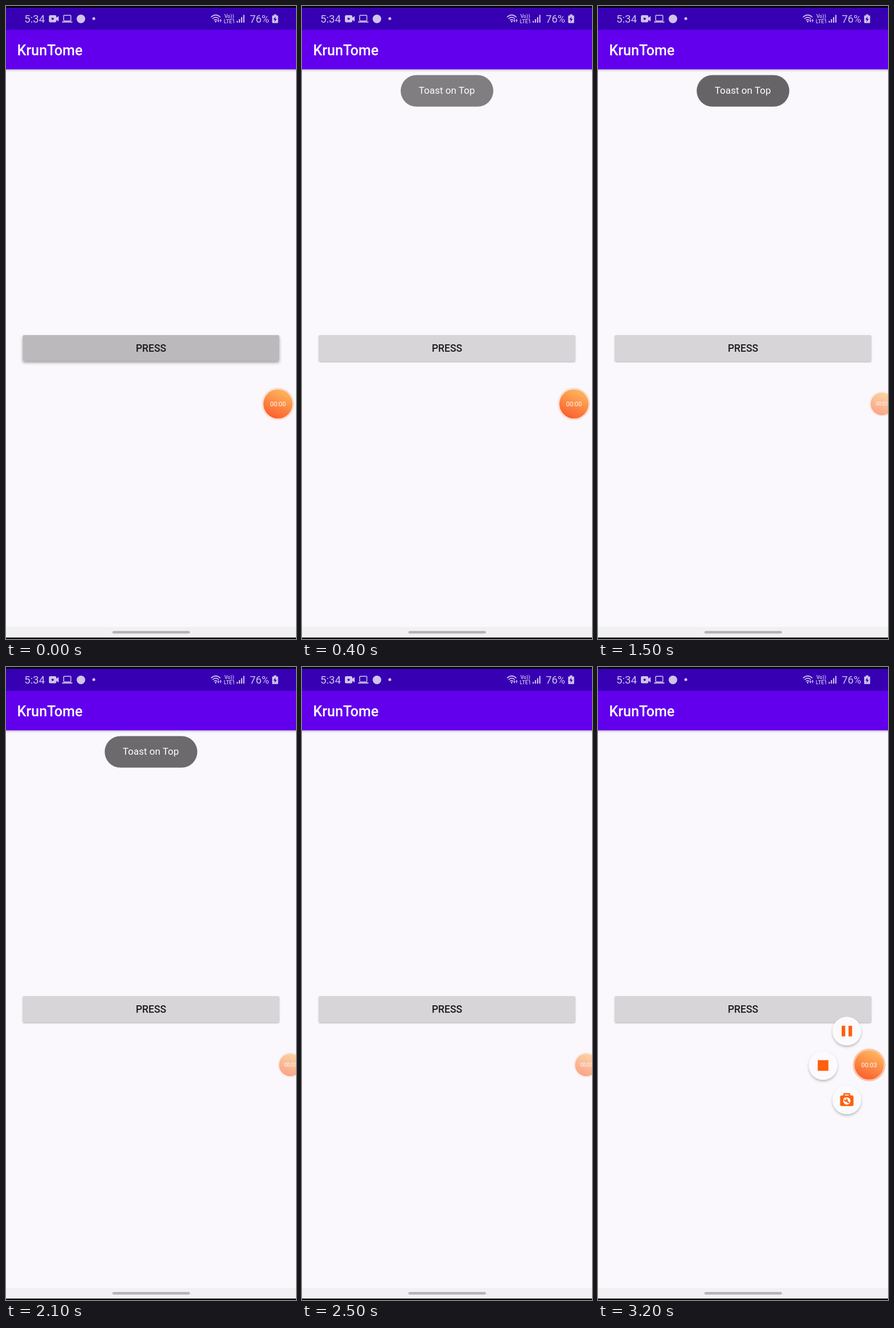
Recreate the animation shown at these times as an HTML page. Size 507x1104 px, loop 3.5 s.

```html
<!DOCTYPE html>
<html lang="en">
<head>
<meta charset="utf-8">
<title>Toast demo</title>
<style>
html, body { margin: 0; width: 100%; height: 100%; overflow: hidden; background: #faf8fc; }
svg { display: block; width: 100vw; height: 100vh; }
text { font-family: Roboto, sans-serif; }
.mid { text-anchor: middle; }
</style>
</head>
<body>
<svg viewBox="0 0 507 1104" preserveAspectRatio="none">
  <defs>
    <linearGradient id="glow" x1=".7" y1=".05" x2=".3" y2=".97">
      <stop offset="0" stop-color="#fdb55d"/>
      <stop offset="1" stop-color="#fb602e"/>
    </linearGradient>
    <linearGradient id="barShade" x1="0" y1="0" x2="0" y2="1">
      <stop offset="0" stop-color="#000" stop-opacity=".2"/>
      <stop offset="1" stop-color="#000" stop-opacity="0"/>
    </linearGradient>
    <filter id="lift" x="-30%" y="-30%" width="160%" height="170%">
      <feDropShadow dx="0" dy="2.5" stdDeviation="2.3" flood-color="#000" flood-opacity=".27"/>
    </filter>
    <filter id="btnShade" filterUnits="userSpaceOnUse" x="15" y="560" width="480" height="80">
      <feDropShadow id="drop" dx="0" dy="1" stdDeviation="1" flood-color="#000" flood-opacity=".3"/>
    </filter>
  </defs>

  <rect width="507" height="1104" fill="#faf8fc"/>
  <rect y="110" width="507" height="5" fill="url(#barShade)"/>
  <rect y="41" width="507" height="69.5" fill="#6200ee"/>
  <rect y="2" width="507" height="39.5" fill="#3700b3"/>
  <rect width="507" height="3" fill="#000"/>
  <text x="19.5" y="86" font-size="25" font-weight="500" fill="#fff">KrunTome</text>

  <g fill="#d0c4ec">
    <text x="32" y="29.3" font-size="18.7">5:34</text>
    <rect x="75" y="16" width="13" height="12.5" rx="2.5"/>
    <path d="M87 21 L92 17.5 V27 L87 23.5Z"/>
    <circle cx="81.5" cy="22.2" r="2" fill="#3700b3"/>
    <rect x="100.8" y="16.3" width="12.6" height="9.6" rx="1" fill="none" stroke="#d0c4ec" stroke-width="1.5"/>
    <rect x="98" y="27" width="18" height="1.8"/>
    <circle cx="131" cy="22.5" r="7.5"/>
    <circle cx="153.5" cy="22" r="2.5"/>
    <g fill="none" stroke="#d0c4ec" stroke-width="1.5">
      <path d="M358.4 19.4 Q366.6 11.8 374.8 19.4"/>
      <path d="M361 22.3 Q366.6 17 372.2 22.3"/>
      <path d="M363.6 25 Q366.6 22.2 369.4 25"/>
    </g>
    <circle cx="366.6" cy="27.2" r="1.4"/>
    <path d="M369.4 25.6h1.3v-2.6h1.2v2.6h1.3l-1.9 3z M373.3 25.6l1.9-3 1.9 3h-1.3v2.7h-1.2v-2.7z"/>
    <text class="mid" x="390.3" y="21.4" font-size="9" font-weight="500">Vo))</text>
    <text class="mid" x="390.5" y="30" font-size="9" font-weight="500">LTE1</text>
    <path d="M403.3 29v-3h2.1v3z M407.1 29v-6h2.1v6z M410.9 29v-9.5h2.1v9.5z M414.7 29v-13.5h2.1v13.5z"/>
    <text x="426.3" y="29.3" font-size="18.3">76%</text>
    <path d="M468.5 14.5h4v2h2a1.2 1.2 0 0 1 1.2 1.2v10.8a1.2 1.2 0 0 1-1.2 1.2h-8a1.2 1.2 0 0 1-1.2-1.2v-10.8a1.2 1.2 0 0 1 1.2-1.2h2z"/>
    <path d="M471.4 18.3l-4 5.4h2.6l-.6 4.2 4.1-5.4h-2.7z" fill="#3700b3"/>
  </g>

  <g id="toast">
    <rect x="172.5" y="120.5" width="162" height="55" rx="27.5" fill="#666466"/>
    <text class="mid" x="253.2" y="153.2" font-size="17" fill="#fff">Toast on Top</text>
  </g>

  <rect id="btn" x="29.3" y="574" width="448.4" height="45.7" rx="2" filter="url(#btnShade)"/>
  <text class="mid" x="253.5" y="603.3" font-size="17.5" font-weight="500" fill="#1b1a1c">PRESS</text>

  <rect y="1083" width="507" height="19" fill="#f2f0f3"/>
  <rect x="186" y="1090" width="135.5" height="4.6" rx="2.3" fill="#b5b3b6"/>
  <rect y="1101.5" width="507" height="2.5" fill="#000"/>

  <g id="menu" fill="#ff600c">
    <g>
      <circle r="25" fill="#fbfafc" filter="url(#lift)"/>
      <path d="M-9 -9.3h6.2v18.6h-6.2z M3 -9.3h6.2v18.6h-6.2z"/>
    </g>
    <g>
      <circle r="25" fill="#fbfafc" filter="url(#lift)"/>
      <rect x="-9.3" y="-9.3" width="18.6" height="18.6"/>
    </g>
    <g>
      <circle r="25" fill="#fbfafc" filter="url(#lift)"/>
      <rect x="-11.7" y="-7.8" width="23.4" height="18.6" rx="2.4"/>
      <path d="M-4.8 -7v-3.5h9.6v3.5" fill="none" stroke="#ff600c" stroke-width="2.4" stroke-linejoin="round"/>
      <circle cy="1.8" r="6.4" fill="#fbfafc"/>
      <path d="M-1 .8 L3.6 5.4" stroke="#ff600c" stroke-width="2.6"/>
      <circle cx="-1.6" cy=".2" r="3"/>
      <path d="M-5.5 -2.2l2.3 -2.3 2.7 3.5 -1.7 1.7z" fill="#fbfafc"/>
    </g>
  </g>

  <g id="bubble">
    <circle id="ring" r="28.6" fill="#fb7a3c"/>
    <circle r="25.6" fill="#faf8fc"/>
    <circle r="25.6" fill="url(#glow)"/>
    <text id="clock" class="mid" y="4" font-size="11" fill="#fff"></text>
  </g>
</svg>
<script>
const LOOP = 3500, STEP = 100;
const $ = id => document.getElementById(id);
const set = (el, attrs) => { for (const k in attrs) el.setAttribute(k, attrs[k]); };
const clamp = x => Math.min(1, Math.max(0, x));
const mix = (a, b, p) => a + (b - a) * p;
const smooth = x => (1 - Math.cos(Math.PI * clamp(x))) / 2;
const easeOut = x => 1 - (1 - clamp(x)) ** 2;
const SPOTS = [[435, 635], [393.5, 695], [435, 755]];
const HOME = { x: 475.5, y: 694 };

function drawToast(t) {
  const shown = smooth((t - 28) / 517), gone = smooth((t - 2036) / 464);
  set($('toast'), { opacity: t < 100 ? 0 : shown * (1 - gone) });
}

function drawButton(t) {
  const p = clamp(t / 200);
  const c = [[187, 215], [185, 213], [188, 216]].map(([a, b]) => Math.round(mix(a, b, p)));
  set($('btn'), { fill: `rgb(${c})`, height: mix(45, 46, p) });
  set($('drop'), {
    dy: mix(3, 1, p), stdDeviation: mix(2.6, 1, p), 'flood-opacity': mix(0.36, 0.3, p)
  });
}

function drawBubble(t) {
  const open = t >= 3000, docked = t >= 1100 && !open;
  const p = docked ? easeOut((t - 1000) / 600) : 0;
  const x = open ? 474 : mix(HOME.x, 497, p);
  set($('bubble'), {
    transform: `translate(${x} ${HOME.y}) scale(${mix(1, 0.77, p)})`,
    opacity: docked ? 0.55 : 1
  });
  set($('ring'), { 'fill-opacity': open ? 0.42 : 0.19 });
  const sec = [1200, 2100, 3000].filter(s => t >= s).length;
  $('clock').textContent = '00:0' + sec;
}

function drawMenu(t) {
  const p = easeOut((t - 2980) / 220);
  set($('menu'), { visibility: t >= 3000 ? 'visible' : 'hidden' });
  SPOTS.forEach(([x, y], i) => set($('menu').children[i], {
    transform: `translate(${mix(474, x, p)} ${mix(HOME.y, y, p)})`
  }));
}

function draw(ms) {
  const t = Math.floor((ms % LOOP) / STEP) * STEP;
  [drawToast, drawButton, drawBubble, drawMenu].forEach(f => f(t));
}

const start = performance.now();
function tick(now) {
  draw(Math.max(0, now - start));
  requestAnimationFrame(tick);
}
draw(0);
requestAnimationFrame(tick);
</script>
</body>
</html>
```
